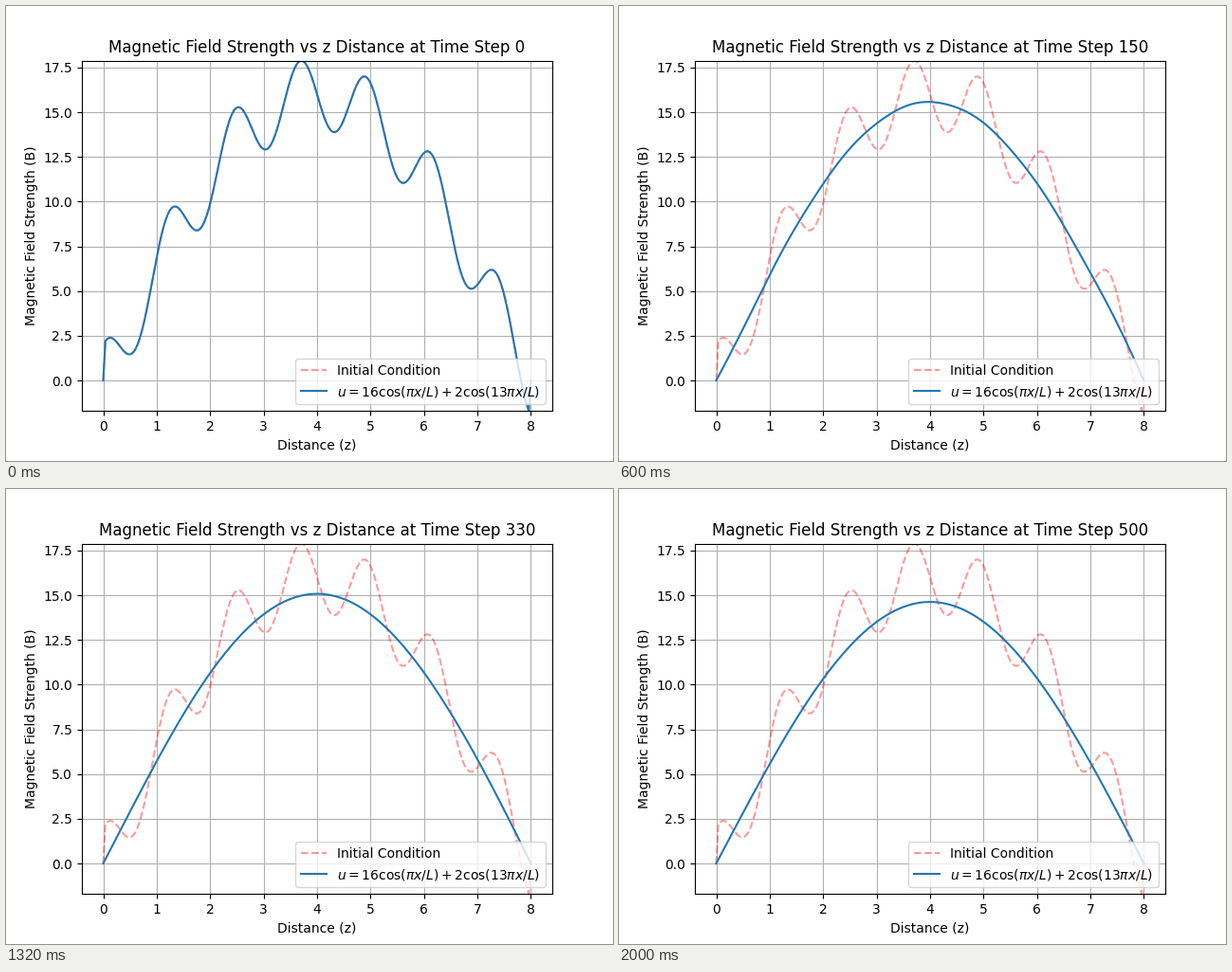
Recreate the animation shown at these times as a matplotlib script. Size 640x480 px, loop 2.04 s.

```python
import numpy as np
import matplotlib.pyplot as plt
from matplotlib.animation import FuncAnimation

L = 8.0            # length of the domain
N = 199            # grid intervals
D = 1.165e-3       # diffusivity times time step
STRIDE = 10        # time steps per frame
FRAMES = 51

x = np.linspace(0, L, N + 1)
u0 = 16 * np.sin(np.pi * x / L) + 2 * np.cos(13 * np.pi * x / L)
u0[0] = u0[-1] = 0

# Sine modes vanish at both ends, so the boundary stays at zero.
k = np.arange(1, N)
modes = np.sin(np.pi * np.outer(x, k) / L)
coeffs = 2 / N * modes.T @ u0
rates = D * (k * np.pi / L) ** 2


def field(step):
    if step == 0:
        return u0
    return modes @ (coeffs * np.exp(-rates * step))


fig, ax = plt.subplots(figsize=(6.4, 4.8), dpi=100)
ax.plot(x, u0, "r--", alpha=0.4, label="Initial Condition")
line, = ax.plot(x, u0, color="tab:blue",
                label=r"$u = 16\cos(\pi x/L) + 2\cos(13\pi x/L)$")
ax.set_xlim(-0.05 * L, 1.05 * L)
ax.set_ylim(u0.min(), u0.max())
ax.set_xlabel("Distance (z)")
ax.set_ylabel("Magnetic Field Strength (B)")
ax.grid(True)
ax.legend(loc="lower right")


def update(i):
    step = i * STRIDE
    line.set_ydata(field(step))
    ax.set_title(f"Magnetic Field Strength vs z Distance at Time Step {step}")
    return line,


anim = FuncAnimation(fig, update, frames=FRAMES, interval=40,
                     repeat=True, repeat_delay=0, blit=False)
plt.show()
```
